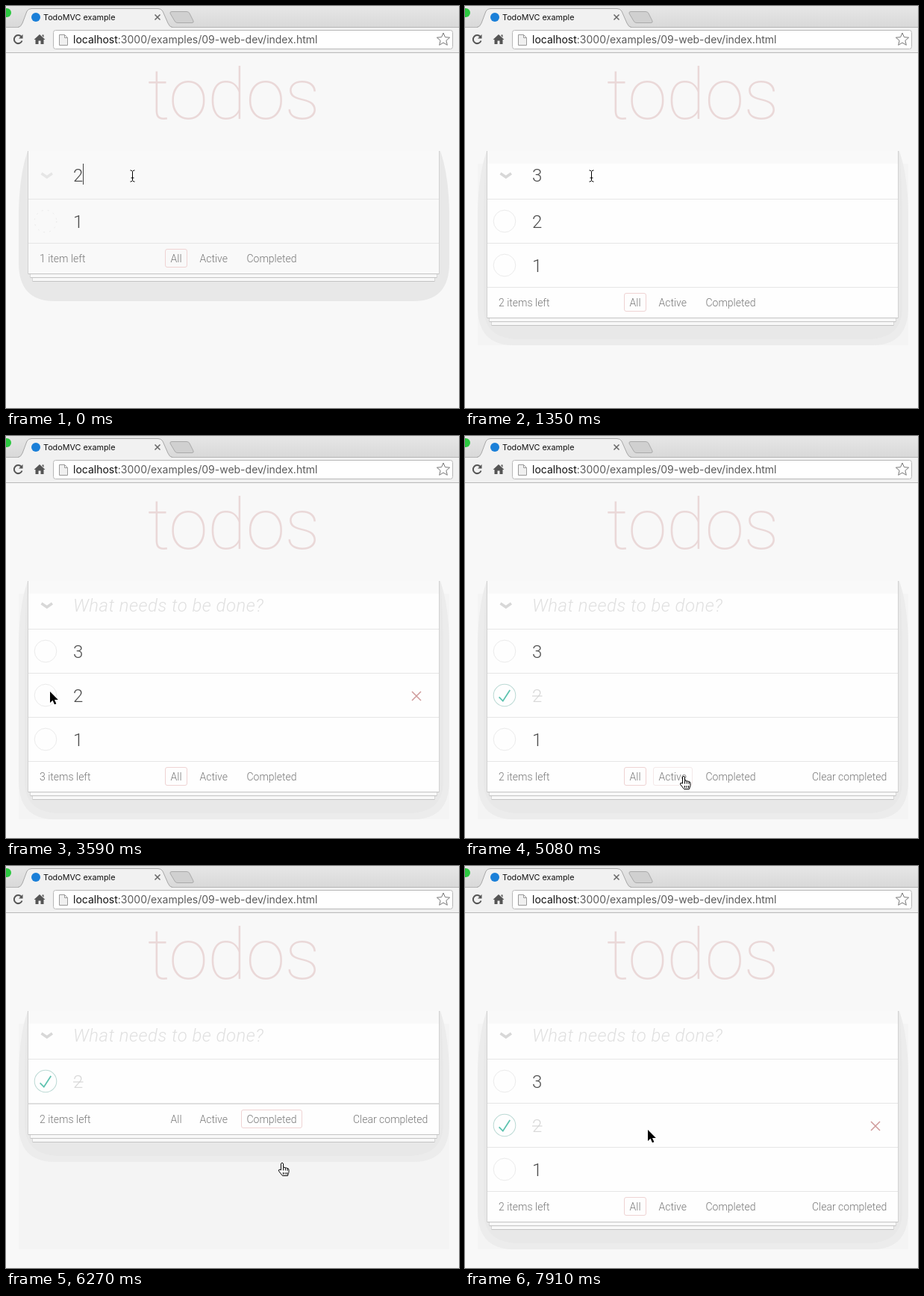
An HTML page that plays this animation: 607 by 538 pixels, repeating every 8 s.

```html
<!DOCTYPE html>
<html lang="en">
<head>
<meta charset="utf-8">
<title>TodoMVC example</title>
<style>
  html, body { margin: 0; height: 100%; overflow: hidden; background: #f8f8f8; }
  svg { display: block; width: 100vw; height: 100vh; }
  text { white-space: pre; }
  .ui { font-family: Inter, "Open Sans", sans-serif; }
  .app { font: 300 14px Roboto, "Liberation Sans", sans-serif; fill: #777; }
  .title { font: 100 95px Roboto, Lato, sans-serif; letter-spacing: -.4px; fill: #ead8d8; }
  .item { font-size: 24px; fill: #4d4d4d; }
  .done { fill: #d9d9d9; }
  .hint { font-size: 24px; font-style: italic; letter-spacing: .47px; fill: #e0e0e0; }
  .line { fill: none; }
</style>
</head>
<body>
<svg viewBox="0 0 607 538">
  <defs>
    <linearGradient id="strip" x2="0" y2="1">
      <stop stop-color="#e7e7e7"/><stop offset="1" stop-color="#d8d8d8"/>
    </linearGradient>
  </defs>

  <g class="ui">
    <rect width="607" height="29" fill="url(#strip)"/>
    <circle cx="1" cy="9" r="6" fill="#2bc840"/>
    <path d="M0 28.5H607" stroke="#b4b4b4"/>
    <rect y="29" width="607" height="33" fill="#f1f1f1"/>
    <path d="M16 29Q20 28 22 23L28 7Q30 3.5 34 3.5H204Q208 3.5 210 7L217 23Q219 28 223 29Z" fill="#f1f1f1"/>
    <path class="line" d="M16 28.5Q20 28 22 23L28 7Q30 3.5 34 3.5H204Q208 3.5 210 7L217 23Q219 28 223 28.5" stroke="#a8a8a8"/>
    <path d="M222 7.5H242Q245 7.5 246 10L251 20Q252 22.5 249 22.5H230Q227 22.5 226 20L220 10Q219.5 7.5 222 7.5Z" fill="#d0d0d0" stroke="#aaa"/>
    <path d="M0 62.5H607" stroke="#b9b9b9"/>
    <circle cx="40" cy="15" r="6" fill="#1a7fd8"/>
    <text x="50" y="19" font-size="10.8" fill="#111">TodoMVC example</text>
    <path d="M199.5 11.5l7 7m0-7l-7 7" stroke="#666" stroke-width="1.5"/>

    <path class="line" d="M20.5 41A5.5 5.5 0 1 0 21.5 46.5" stroke="#555" stroke-width="2"/>
    <path d="M22.5 38V43.5H17Z" fill="#555"/>
    <path d="M45 38L52.5 45H50.5V51H46.5V46.5H43.5V51H39.5V45H37.5ZM48.5 38.5H50.5V42L48.5 40Z" fill="#555"/>
    <rect x="63.5" y="32.5" width="535" height="25" rx="3" fill="#fff" stroke="#b8b8b8"/>
    <path d="M71.5 38.5H78.5L82.5 42.5V52.5H71.5ZM78.5 38.5V42.5H82.5" fill="#f0f0f0" stroke="#999"/>
    <text x="90" y="50" font-size="14" fill="#5c5c5c"><tspan fill="#111">localhost</tspan>:3000/examples/09-web-dev/index.html</text>
    <path class="line" d="M586 36L588.4 41.7L594.6 42.2L589.9 46.3L591.3 52.3L586 49.1L580.7 52.3L582.1 46.3L577.4 42.2L583.6 41.7Z" stroke="#777"/>
  </g>

  <text class="title" x="189.500" y="150.500">todos</text>
  <g id="app" class="app"></g>
</svg>

<script>
const LOOP = 8000, STEP = 146, ROW = 59;

// Each entry overrides parts of the state from its time on.
const states = [
  [0, { rows: '1', input: '2', filter: 'All', done: false, left: 1 }],
  [150, { rows: '21', input: '', left: 2 }],
  [900, { input: '3' }],
  [1650, { rows: '321', input: '', left: 3 }],
  [4190, { done: true, left: 2 }],
  [5230, { rows: '31', filter: 'Active' }],
  [6270, { rows: '2', filter: 'Completed' }],
  [7470, { rows: '321', filter: 'All' }]
];

const caretOn = [[0, 600], [900, 1350], [1650, 2100], [2690, 3140]];

// Pointer moves: start time, number of steps, end point.
const moves = [
  [1950, 6, 176, 354],
  [2990, 3, 112, 360],
  [3440, 2, 59, 342],
  [3740, 2, 54, 345],
  [4340, 6, 293, 455],
  [5380, 3, 370, 397],
  [6420, 5, 226, 342],
  [7760, 2, 245, 353]
];

const filters = [['All', 213, 30], ['Active', 252, 53], ['Completed', 315, 82]];

function stateAt(t) {
  const s = Object.assign({}, ...states.filter(e => e[0] <= t).map(e => e[1]));
  s.bottom = 299 + ROW * s.rows.length + (s.filter === 'Completed' ? 1 : 0);
  return s;
}

// The hovered part depends on the layout at the latest move.
function pointerAt(t) {
  let x = 169.5, y = 227.5, moved = 0;
  for (const [start, steps, toX, toY] of moves) {
    if (t < start) break;
    const k = Math.min(steps, Math.floor((t - start) / STEP) + 1);
    x += (toX - x) * k / steps;
    y += (toY - y) * k / steps;
    moved = start + (k - 1) * STEP;
  }
  const s = stateAt(moved), p = { x, y, kind: 'beam', row: -1, filter: '' };
  if (y < 258) return p;
  p.kind = 'arrow';
  const row = Math.floor((y - 259) / ROW);
  if (row < s.rows.length) p.row = row;
  for (const [name, left, width] of filters)
    if (x >= left && x <= left + width && Math.abs(y - s.bottom + 20) < 18) {
      p.filter = name;
      p.kind = 'hand';
    }
  return p;
}

const rect = (x, y, w, h, fill, more = '') =>
  `<rect x="${x}" y="${y}" width="${w}" height="${h}" fill="${fill}" ${more}/>`;
const path = (d, more) => `<path d="${d}" ${more}/>`;
const text = (x, y, str, cls = '') => `<text x="${x}" y="${y}" class="${cls}">${str}</text>`;
const rule = (y, color) => rect(30, y, 550, 1, color);

function shadow(b, inset, fill) {
  const l = 17 + inset, r = 611 - l, low = b + 37 - inset;
  return path(`M29 194Q${l + 1} 225 ${l} 275V${b - 14}Q${l} ${low} ${l + 48} ${low}` +
    `H${r - 48}Q${r} ${low} ${r} ${b - 14}V275Q${r - 1} 225 582 194Z`, `fill="${fill}"`);
}

function card(t, b) {
  const fresh = t >= 150;
  let out = '';
  if (fresh) out += rect(17, 211, 577, (t < 1650 ? 454 : 513) - 211, '#f4f4f4');
  out += shadow(b, 0, fresh ? '#ececec' : '#e8e8e8');
  if (fresh) out += shadow(b, 8, '#e8e8e8');
  for (const [inset, drop] of [[6, 10], [3, 5], [0, 0]]) {
    const w = 550 - 2 * inset;
    out += rect(29.5 + inset, b - 6, w + 1, drop + 7, '#c4c4c4') +
      rect(30 + inset, b - 6, w, drop + 6, '#f8f8f8');
  }
  out += rect(29, 194, 552, b - 194, '#d2d2d2') + rect(30, 194, 550, b - 194, '#f9f9f9');
  if (fresh) out += rect(30, 211, 550, b - 211, '#fefefe');
  return out;
}

function toggle(y, done, faint) {
  if (!done)
    return `<circle cx="53" cy="${y}" r="14.8" fill="none" stroke="#ebebeb" ${faint ? 'stroke-dasharray="2 6"' : ''}/>`;
  return `<g transform="translate(53 ${y}) scale(.296) translate(-50 -50)">` +
    '<circle cx="50" cy="50" r="50" fill="none" stroke="#bddad5" stroke-width="3.5"/>' +
    path('M72 25L42 71 27 56l-4 4 20 20 34-52z', 'fill="#5dc2af"') + '</g>';
}

function item(name, i, s, t, hover) {
  const y = 288 + ROW * i, done = s.done && name === '2';
  let out = toggle(y, done, t < 150) + text(90, y + 9, name, done ? 'item done' : 'item');
  if (done) out += rect(90, y + 0.5, 13.5, 1, '#d0d0d0');
  if (hover) out += path(`M544 ${y - 5}l12 12m0-12l-12 12`, 'stroke="#cf9a9a" stroke-width="1.5"');
  return out + rule(y + 29, '#e6e6e6');
}

function footer(s, hover) {
  const y = s.bottom - 15;
  let out = text(45, y, `${s.left} item${s.left > 1 ? 's' : ''} left`);
  for (const [name, x, w] of filters) {
    const color = name === s.filter ? '#efd3d3' : name === hover ? '#f4e9e9' : '';
    if (color) out += rect(x + 0.5, y - 17.5, w - 1, 24, 'none', `rx="2.5" stroke="${color}"`);
    out += text(x + 7.5, y, name);
  }
  return s.done ? out + text(465, y, 'Clear completed') : out;
}

const beam = 'M-3-7.5H-1.5L0-6L1.500-7.5H3M0-6V6M-3 7.5H-1.5L0 6L1.5 7.5H3M-2 2.5H2';
const pointers = {
  beam: path(beam, 'fill="none" stroke="#fff" stroke-width="2"') + path(beam, 'fill="none" stroke="#000"'),
  arrow: path('M0 0V15L3.5 11.8L6 17.3L8.4 16.3L6 10.9H10.8Z',
    'stroke="#fff" stroke-width="2" paint-order="stroke" fill="#000"'),
  hand: path('M-1.5 10V1.2Q0-.8 1.5 1.2V6.5Q3 5.5 4.3 7Q5.8 6.2 7 7.8Q8.8 7.3 9 9.5V12.5L7.5 17.5H.5L-4.5 11.2Q-5 9-2.8 9.3Z' +
    'M1.5 6.5v4M4.3 7v3.5M7 7.8v3M1.5 13v3M4 13v3M6.500 13v3', 'fill="#fff" stroke="#000" stroke-linejoin="round"')
};

function scene(t) {
  const s = stateAt(t), p = pointerAt(t);
  const chevron = t < 150 ? '#e6e6e6' : '#d8d8d8';
  let out = card(t, s.bottom) + rule(258, '#e6e6e6');
  out += path('M47.5 224L54.8 229L62 224', `fill="none" stroke="${chevron}" stroke-width="3.5"`);
  out += s.input ? text(90, 234.5, s.input, 'item') : text(90, 234.5, 'What needs to be done?', 'hint');
  if (caretOn.some(([from, to]) => t >= from && t < to))
    out += rect(s.input ? 103 : 90, 211, 1, 28, '#444');
  out += [...s.rows].map((name, i) => item(name, i, s, t, i === p.row)).join('');
  if (s.filter === 'Completed') out += rule(318, '#d8d8d8');
  out += footer(s, p.filter);
  return out + `<g transform="translate(${p.x} ${p.y})">${pointers[p.kind]}</g>`;
}

const app = document.getElementById('app');
const begin = performance.now();
let shown = '';

function draw() {
  const next = scene((performance.now() - begin) % LOOP);
  if (next !== shown) app.innerHTML = shown = next;
  requestAnimationFrame(draw);
}
draw();
</script>
</body>
</html>
```
